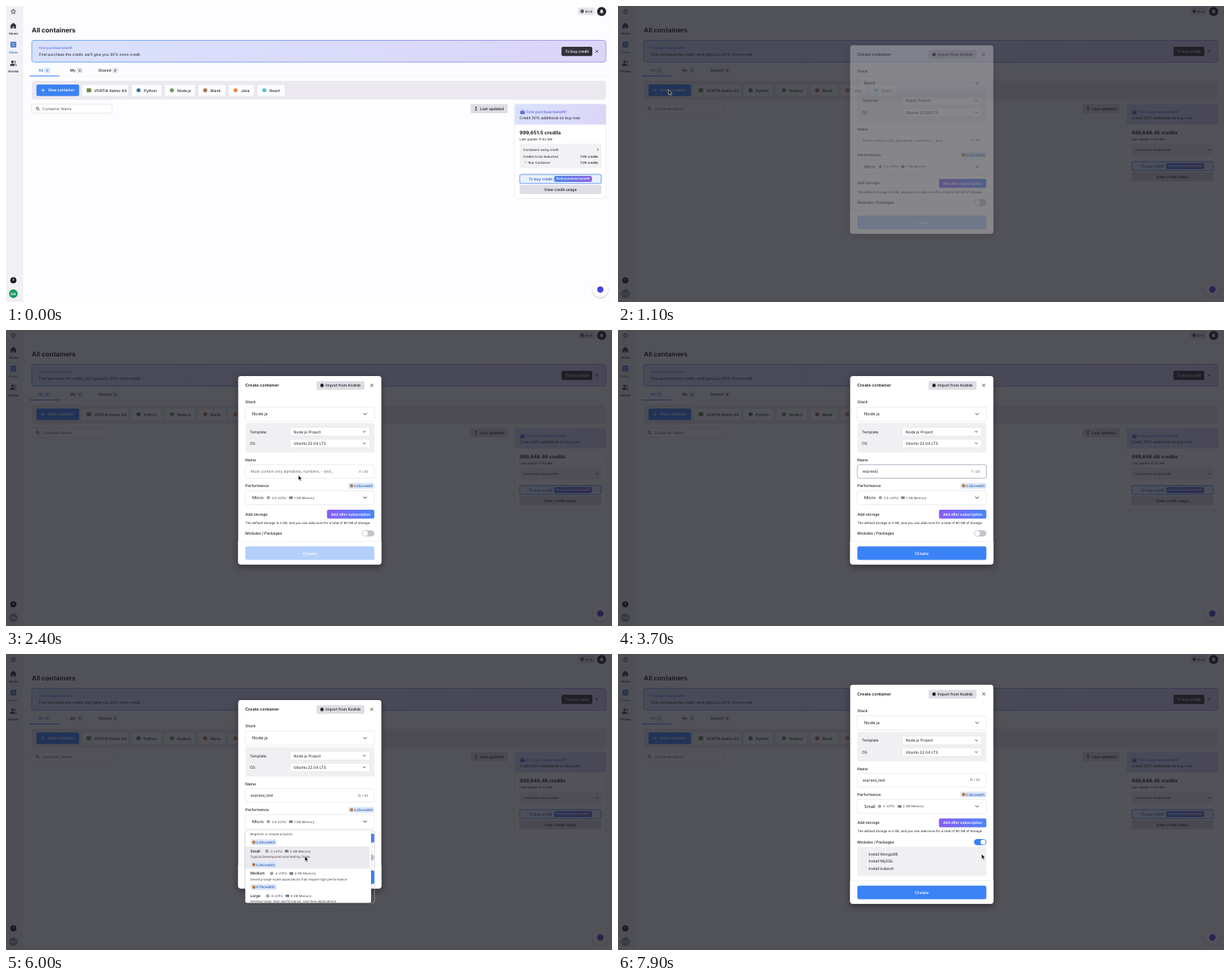
Recreate the animation shown at these times as an HTML page. Size 800 by 392 pixels, loop 8 s.

```html
<!DOCTYPE html>
<html lang="en">
<head>
<meta charset="utf-8">
<title>Create a container</title>
<style>
html, body { margin: 0; width: 100%; height: 100%; overflow: hidden; background: #fdfcfe; }
svg { display: block; width: 800px; height: 392px; }
text { font-family: Inter, Roboto, sans-serif; text-rendering: geometricPrecision; white-space: pre; }
</style>
</head>
<body>
<svg id="stage" viewBox="0 0 800 392" xmlns="http://www.w3.org/2000/svg"></svg>
<script>
const LOOP = 8000, STEP = 100;
const INK = '#1d1c22', SOFT = '#45444d', BLUE = '#3b82f6', LINE = '#d8d7dd', GREY = '#dedde4';
const SMALL = 4.29, BODY = 5, LARGE = 5.71;

// Markup helpers; text is placed by its vertical centre.
const text = (x, y, s, o = {}) => {
  const size = o.size || BODY;
  return `<text x="${x}" y="${y + size * 0.36}" font-size="${size}" font-weight="${o.w || 400}" fill="${o.fill || INK}"` +
    ` text-anchor="${o.anchor || 'start'}"${o.id ? ` id="${o.id}"` : ''}>${s}</text>`;
};
const rect = (x, y, w, h, r, fill, stroke = 'none', extra = '') =>
  `<rect x="${x}" y="${y}" width="${w}" height="${h}" rx="${r}" fill="${fill}" stroke="${stroke}" stroke-width=".5" ${extra}/>`;
const dot = (x, y, r, fill, extra = '') => `<circle cx="${x}" cy="${y}" r="${r}" fill="${fill}" ${extra}/>`;
const path = (d, stroke = INK, w = 0.8, fill = 'none') =>
  `<path d="${d}" stroke="${stroke}" stroke-width="${w}" fill="${fill}" stroke-linecap="round" stroke-linejoin="round"/>`;
const group = (id, body, extra = '') => `<g id="${id}" ${extra}>${body}</g>`;
const chevron = (x, y, k = 2) => path(`M${x - k} ${y - k / 2}l${k} ${k} ${k} ${-k}`, INK, 0.8);
const cross = (x, y, k = 1.7) => path(`M${x - k} ${y - k}l${2 * k} ${2 * k}m0 ${-2 * k}l${-2 * k} ${2 * k}`, INK, 0.7);
const gradient = (id, a, b) =>
  `<linearGradient id="${id}"><stop stop-color="${a}"/><stop offset="1" stop-color="${b}"/></linearGradient>`;
const shadow = (id, dy, blur, alpha) =>
  `<filter id="${id}" x="-50%" y="-50%" width="200%" height="200%" color-interpolation-filters="sRGB">` +
  `<feDropShadow dx="0" dy="${dy}" stdDeviation="${blur}" flood-opacity="${alpha}"/></filter>`;

const defs = `<defs>
  ${gradient('wash', '#d9e1fd', '#dcd5f8')}${gradient('edge', '#4b9bf5', '#9a85ea')}
  ${gradient('promo', '#4d86ee', '#8a63dc')}${gradient('storage', '#8b5cf6', '#4a86f7')}
  ${shadow('soft', 1, 1.6, 0.22)}${shadow('deep', 3, 4, 0.4)}
  <clipPath id="modalClip"><rect id="modalShape" x="306.5" y="61" width="189" height="249.5" rx="3.5"/></clipPath>
  <clipPath id="listClip"><rect x="316" y="234" width="166" height="95.5" rx="2"/></clipPath>
</defs>`;

function sidebar() {
  const label = (y, s, fill) => text(9.7, y, s, { size: SMALL, anchor: 'middle', fill, w: 500 });
  return rect(0, 0, 22, 392, 0, '#f1f0f4') + path('M22.2 0V392', '#e6e5ea', 0.5) +
    path('M9.7 4.3l.9 1.9 2.1.3-1.5 1.5.4 2.1-1.9-1-1.9 1 .4-2.1-1.5-1.5 2.1-.3z', INK, 0.7) +
    path('M6.5 25.2l3.2-2.6 3.2 2.6v4.3h-2.2v-2.6H8.7v2.6H6.5z', INK, 0.5, '#33323b') + label(36, 'Home') +
    rect(6, 47.5, 7.4, 7.2, 1, '#2563c9') + path('M7.5 49.5h4.4m-4.4 1.7h4.4m-4.4 1.7h4.4', '#fff', 0.6) + label(61, 'Vemo', '#2563c9') +
    dot(8.5, 74, 1.7, '#33323b') + path('M5.5 79q0-2.4 3-2.4t3 2.4z', INK, 0.3, '#33323b') +
    path('M11.4 72.6a1.5 1.5 0 010 2.9M12.2 76.8q1.6.5 1.6 2.2', INK, 0.8) + label(86, 'Vemlot') +
    dot(9.7, 363.2, 4, '#17161b') + text(9.7, 363.2, '?', { anchor: 'middle', fill: '#fff', w: 700 }) +
    dot(9.7, 381, 5.7, '#16985f', 'id="avatar"') + text(9.7, 381, 'MB', { anchor: 'middle', fill: '#fff', size: 4.6, w: 500 });
}

function header() {
  return rect(755, 2, 22.5, 10, 3, '#e6e5eb') + dot(760.6, 7, 2.4, '#5b5a63') + text(765, 7.1, 'D+3', { size: SMALL, w: 600 }) +
    dot(786.3, 7.2, 6, '#25242b') + path('M784.2 8.6q.7-.6.7-2.2a1.4 1.4 0 012.8 0q0 1.6.7 2.2z', '#fff', 0.4, '#fff') + dot(786.3, 9.6, 0.6, '#fff') +
    text(34, 32.4, 'All containers', { size: 8.57, w: 700 }) +
    rect(34, 45.5, 758, 28.8, 3, 'url(#wash)', 'url(#edge)', 'style="stroke-width:.8"') +
    text(43.5, 55.6, 'First purchase benefit', { size: SMALL, fill: '#3b5fd0' }) +
    text(43.5, 64, 'First purchase the credit, we’ll give you 30% more credit.') +
    rect(733.3, 54, 40.7, 12.3, 2, '#33323b') + text(753.7, 60.1, 'To buy credit', { anchor: 'middle', fill: '#fff', w: 500 }) + cross(780, 60, 1.5);
}

function tabs() {
  const tab = (x, s, px, fill, bg) => text(x, 85.2, s, { fill, w: 500 }) +
    rect(px, 81.5, 7.6, 7.6, 2, bg) + text(px + 3.8, 85.3, '0', { size: SMALL, anchor: 'middle', fill, w: 500 });
  return path('M31 93H792', '#e5e4ea', 0.5) + path('M31.5 92.7H70', BLUE, 1) +
    tab(43, 'All', 50.7, '#2563c9', '#d8e6fc') + tab(84.5, 'My', 93.5, INK, '#e5e4ea') + tab(121.8, 'Shared', 140.3, INK, '#e5e4ea');
}

function stacks() {
  const cards = [
    [100, 61.7, 'VORTIA Kelmo K4', '#6f8a4c'], [165.5, 40, 'Python', '#3b72a8'], [209.5, 40.2, 'Node.js', '#5f9e54'],
    [253.5, 36.5, 'Blank', '#a8704a'], [293.5, 34.3, 'Java', '#e08a3c'], [331.5, 36.8, 'React', '#52c5e4']
  ];
  return rect(34, 99, 758, 25, 3, '#ebe9ef') + rect(40.2, 104, 56.3, 15.2, 2, BLUE) +
    path('M46.8 111.6h4m-2-2v4', '#fff', 0.7) + text(56, 111.7, 'New container', { fill: '#fff', w: 600, size: 4.9 }) +
    cards.map(([x, w, s, c], i) => rect(x, 104, w, 15.2, 2, '#fdfcfe', '#e0dfe5') +
      (i ? dot(x + 9.5, 111.6, 2.7, c) : rect(x + 6.5, 109, 6, 5.2, 0.5, c)) + text(x + 16.5, 111.7, s, { w: 500 })).join('');
}

function tools() {
  return rect(34, 130, 106, 12, 2, '#fff', '#cfced5') + dot(41.4, 135.6, 1.6, 'none', `stroke="${INK}" stroke-width=".7"`) +
    path('M42.7 136.9l1.4 1.4', INK, 0.7) + text(48, 136, 'Container Name', { fill: '#55545d' }) +
    rect(613.3, 130, 49, 12, 2, GREY) + path('M620.5 133.6v4.8m-1.2-3.6l1.2-1.3 1.2 1.3m-2.4 2.4l1.2 1.3 1.2-1.3', INK, 0.6) +
    text(626, 136, 'Last updated', { w: 500 });
}

function creditCard() {
  const end = (y, s) => text(781.7, y, s, { size: SMALL, anchor: 'end', w: 500 });
  const small = (x, y, s) => text(x, y, s, { size: SMALL });
  const actions = rect(678.2, 223, 107.6, 12, 2, '#eaf1fd', BLUE, 'style="stroke-width:.8"') +
    text(690, 229, 'To buy credit', { fill: '#1f56c4', w: 500 }) + rect(723.6, 225, 50, 8, 2.5, 'url(#promo)') +
    text(748.6, 229, 'First purchase benefit', { size: 4.15, fill: '#fff', w: 600, anchor: 'middle' }) +
    rect(678, 237, 108, 12, 2, GREY) + text(732, 243, 'View credit usage', { anchor: 'middle', w: 500 });
  return rect(671.3, 130, 121, 125, 3, '#fff', '#dddce3', 'id="cardBox"') +
    path('M671.5 157V133q0-3 3-3H789q3 0 3 3V157z', 'none', 0, 'url(#wash)') +
    rect(679, 139, 5.8, 4.2, 0.5, '#5b62dc') + path('M681.9 137.8v5.4m0-5.4q-2-1.6-2.3 0m2.3 0q2-1.6 2.3 0', '#8d92ee', 0.7) +
    text(687, 140, 'First purchase benefit!', { fill: '#4553cf' }) + text(678, 148.3, 'Credit 30% additional on buy now') +
    text(678, 167.7, '', { size: 6.43, w: 700, id: 'credits' }) + small(678, 176.2, 'Last update 11:42 AM') +
    rect(678, 182.5, 108, 32.5, 2, '#f2f1f4', 'none', 'id="usageBox"') + small(682.5, 190.5, 'Containers using credit') +
    group('usage', end(190.5, '1') + small(682.5, 199, 'Credits to be deducted') + end(199, '7.09 credits') +
      dot(685.8, 207, 0.5, INK) + small(689.5, 207, 'Run Container') + end(207, '7.09 credits')) +
    group('usageArrow', chevron(780.3, 190.3, 1.5)) + group('actions', actions);
}

const chat = dot(784.6, 375.5, 10, '#fff', 'filter="url(#soft)"') + dot(784.6, 375.5, 4.2, '#4a45d6');

const specs = (x, y, cpu, mem, gap = 0) => dot(x, y, 2.1, '#8b8a92') + dot(x, y, 0.8, '#d6d5da') +
  text(x + 4.8, y, cpu, { size: SMALL, fill: SOFT }) +
  rect(x + 27.4 - gap, y - 1.6, 4.8, 3.3, 0.5, '#6d7482') + path(`M${x + 28 - gap} ${y + 1}h3.6`, '#c3c8d2', 0.4) +
  text(x + 34 - gap, y, mem, { size: SMALL, fill: SOFT });
const price = (x, y, s) => rect(x, y - 3.9, 34.3, 7.8, 2, '#d8e6fc') + dot(x + 4.2, y, 2.2, '#c98540') +
  dot(x + 3.6, y - 0.4, 0.5, '#7a4a22') + dot(x + 4.8, y + 0.6, 0.5, '#7a4a22') +
  text(x + 7.2, y, s, { size: SMALL, fill: '#27509f', w: 500 });

function modal() {
  const label = (y, s) => text(316, y, s, { w: 500 });
  const field = (y, h, extra = '') => rect(316, y, 170.3, h, 2.5, '#fff', LINE, extra);
  const select = (y, name, id, value) => text(322, y, name) + rect(375, y - 5.8, 105.3, 11.5, 1.5, '#fff', LINE) +
    text(379.7, y, value, { id }) + chevron(473, y, 1.3);
  const plan = (id, name, x, cpu, mem, gap, cost) => group(id,
    text(325, 222, name, { size: LARGE }) + specs(x, 222, cpu, mem, gap) + price(452, 206.3, cost));
  const check = (y, s) => rect(322.2, y - 2.6, 5.2, 5.2, 1, '#f0eff2', '#dcdbe1') + text(331, y, s);
  const modules = rect(316, 275.5, 170.3, 39, 2, '#f0eff2') +
    check(285.3, 'Install MongoDB') + check(294.8, 'Install MySQL') + check(304.4, 'Install kubectl');
  const footer = rect(306, 280, 190, 32, 0, '#fff') + path('M306 280H496', '#dfdee4', 0.5) +
    rect(316, 286.5, 170.3, 18, 2.5, BLUE, 'none', 'id="create"') +
    text(401, 295.6, 'Create', { size: LARGE, anchor: 'middle', fill: '#fff', w: 500 });
  return rect(306, 60, 190, 300, 0, '#fff') +
    text(316, 73.2, 'Create container', { size: 5.5, w: 600 }) + rect(410, 67.7, 63.3, 11.6, 2, GREY) +
    dot(417.2, 73.4, 2.3, '#25242b') + text(422, 73.4, 'Import from Kodnib', { w: 500 }) + cross(482.8, 73.3) +
    label(95.6, 'Stack') + field(102, 19) + text(325, 111.4, '', { size: LARGE, id: 'stack' }) + chevron(474, 111.4) +
    rect(316, 123.2, 170.3, 39, 2, '#f0eff2') + select(134.8, 'Template', 'template', '') + select(150.2, 'OS', 'os', 'Ubuntu 22.04 LTS') +
    label(172.2, 'Name') + field(178.3, 18, 'id="nameBox"') + text(323, 187.3, '', { id: 'name' }) +
    text(478, 187, '', { size: SMALL, anchor: 'end', id: 'count', fill: '#55545d' }) +
    label(206.3, 'Performance') + field(212.8, 18.6) + chevron(474, 222) +
    plan('micro', 'Micro', 346.3, '0.5 vCPU', '1 GB Memory', 0, '2.25credit/h') +
    plan('small', 'Small', 345.3, '2 vCPU', '2 GB Memory', 3.3, '5.25credit/h') +
    label(243.8, 'Add storage') + rect(423.7, 238, 62.6, 11.8, 2, 'url(#storage)') +
    text(455, 243.9, 'Add after subscription', { fill: '#fff', w: 600, size: 4.85, anchor: 'middle' }) +
    text(316, 255.2, 'The default storage is 5 GB, and you can add more for a total of 60 GB of storage.', { size: SMALL }) +
    label(269.4, 'Modules / Packages') + rect(470, 265.2, 16.3, 8.4, 4.2, '#c4c3ca', 'none', 'id="track"') +
    dot(474.3, 269.4, 3.3, '#fff', 'id="knob"') + group('modules', modules) + group('footer', footer);
}

function planList() {
  const row = (i, name, x, cpu, mem, note, cost) => {
    const y = 241 + i * 29.7;
    return group('row' + i, rect(316, y - 6, 164, 29.2, 0, '#ebeaee'), 'display="none"') +
      text(322.5, y, name, { w: 500 }) + specs(x, y, cpu, mem, i ? 3.8 : 0) +
      text(322.5, y + 7.5, note, { size: SMALL, fill: SOFT }) + price(323, y + 18, cost);
  };
  const rows = row(0, 'Micro', 344.5, '0.5 vCPU', '1 GB Memory', 'Beginner or simple projects', '2.25credit/h') +
    row(1, 'Small', 344.5, '2 vCPU', '2 GB Memory', 'Typical Development and testing Tasks', '5.25credit/h') +
    row(2, 'Medium', 350.7, '4 vCPU', '4 GB Memory', 'Develop large-scale applications that require high performance', '9.75credit/h') +
    row(3, 'Large', 345.5, '8 vCPU', '8 GB Memory', 'Develop large, high-performance, real-time applications', '18.75credit/h');
  return rect(316, 234, 170.5, 95.6, 2, 'none', '#b9b8be') +
    `<g filter="url(#soft)"><g clip-path="url(#listClip)">${rect(316, 234, 166, 96, 2, '#fff')}${group('rows', rows)}</g></g>`;
}

const stackList = () => rect(316, 124, 170.3, 82, 2, '#fff', '#b9b8be') + rect(318, 158.5, 166, 14, 1.5, '#ebeaee', 'none', 'id="stackHover"') +
  ['Blank', 'Python', 'Node.js', 'Java', 'React'].map((s, i) => text(325, 133.5 + i * 16, s)).join('');

const stage = document.getElementById('stage');
stage.innerHTML = defs + rect(0, 0, 800, 392, 0, '#fdfcfe') + sidebar() + header() + tabs() + stacks() + tools() + creditCard() + chat +
  rect(0, 0, 800, 392, 0, '#191921', 'none', 'id="shade"') +
  group('modal', `<g clip-path="url(#modalClip)">${modal()}</g>`, 'filter="url(#deep)"') +
  group('stackList', stackList()) + group('planList', planList()) +
  group('cursor', path('M0 0V6.4L1.5 5.1 2.5 7.4 3.7 6.9 2.7 4.7H4.7Z', '#fff', 0.5, '#08080a'));

const parts = {};
stage.querySelectorAll('[id]').forEach(e => parts[e.id] = e);
const set = (id, attrs) => { for (const k in attrs) parts[id].setAttribute(k, attrs[k]); };
const show = (id, on) => set(id, { display: on ? 'inline' : 'none' });
const write = (id, s) => { if (parts[id].textContent !== s) parts[id].textContent = s; };
const move = (id, x, y) => set(id, { transform: `translate(${x} ${y})` });

const smooth = p => p * p * (3 - 2 * p);
function track(keys, t, ease = smooth) {
  if (t <= keys[0][0]) return keys[0].slice(1);
  for (let i = 1; i < keys.length; i++) {
    const [a, b] = [keys[i - 1], keys[i]];
    if (t <= b[0]) {
      const p = ease((t - a[0]) / (b[0] - a[0]));
      return a.slice(1).map((v, j) => v + (b[j + 1] - v) * p);
    }
  }
  return keys[keys.length - 1].slice(1);
}

const POINTER = [
  [100, 190, 215], [700, 66.5, 111], [1200, 66.5, 111], [1500, 400, 112], [1700, 400, 112], [1900, 392, 164],
  [2100, 392, 164], [2400, 386, 192.5], [2700, 384, 188], [4400, 384, 188], [4700, 397.5, 223], [5100, 397.5, 223],
  [5600, 394.5, 268], [6300, 394.5, 268], [6800, 480, 265], [8000, 480, 265]
];
const FADE = [[1000, 0], [1100, 0.3], [1200, 0.8], [1300, 1]];
const TITLE = 'express_test';

function draw(t) {
  const loaded = t >= 500;
  write('credits', loaded ? '999,648.46 credits' : '999,651.5 credits');
  show('usage', !loaded);
  show('usageArrow', loaded);
  set('usageBox', { height: loaded ? 15.5 : 32.5 });
  set('cardBox', { height: loaded ? 108 : 125 });
  move('actions', 0, loaded ? -17 : 0);

  set('shade', { opacity: track([[900, 0], [1000, 0.4], [1100, 0.75]], t)[0] });
  set('avatar', { fill: t >= 1000 ? '#8a9a92' : '#16985f' });
  const [alpha] = track(FADE, t, p => p);
  const [grow] = track([[6900, 0], [7100, 40.5]], t);
  set('modal', { opacity: alpha });
  move('modal', 0, -13 * (1 - alpha) - grow / 2);
  set('modalShape', { height: 249.5 + grow });
  move('footer', 0, grow);
  show('modules', grow > 0);

  const node = t >= 2100;
  write('stack', node ? 'Node.js' : 'Blank');
  write('template', node ? 'Node.js Project' : 'Empty Project');
  show('stackList', t >= 1600 && t < 2100);
  show('stackHover', t >= 1900);

  const n = Math.max(0, Math.min(TITLE.length, Math.floor((t - 2880) / 115)));
  const focused = t >= 2700 && t < 4700;
  const caret = focused && (n < TITLE.length || t % 1000 < 500);
  write('name', n ? TITLE.slice(0, n) + (caret ? '|' : '') : 'Must contain only alphabets, numbers, - and _');
  set('name', { fill: n ? INK : '#66656e' });
  write('count', n + ' / 20');
  set('nameBox', { stroke: focused ? '#5f6b86' : LINE });
  set('create', { fill: n ? BLUE : '#b4d0fb' });

  const picked = t >= 6400;
  show('micro', !picked);
  show('small', picked);
  show('planList', t >= 4800 && !picked);
  const [scroll] = track([[5500, 0], [5800, 9.7]], t);
  move('rows', 0, -scroll);
  show('row0', t >= 5200 && t < 5500);
  show('row1', t >= 5500);

  const on = t >= 6900;
  set('track', { fill: on ? BLUE : '#c4c3ca' });
  set('knob', { cx: on ? 482 : 474.3 });

  move('cursor', ...track(POINTER, t));
  show('cursor', t >= 200 && !(t >= 2900 && t < 4400));
}

const start = performance.now();
function tick() {
  const t = (performance.now() - start) % LOOP;
  draw(Math.floor(t / STEP) * STEP);
  requestAnimationFrame(tick);
}
tick();
</script>
</body>
</html>
```
